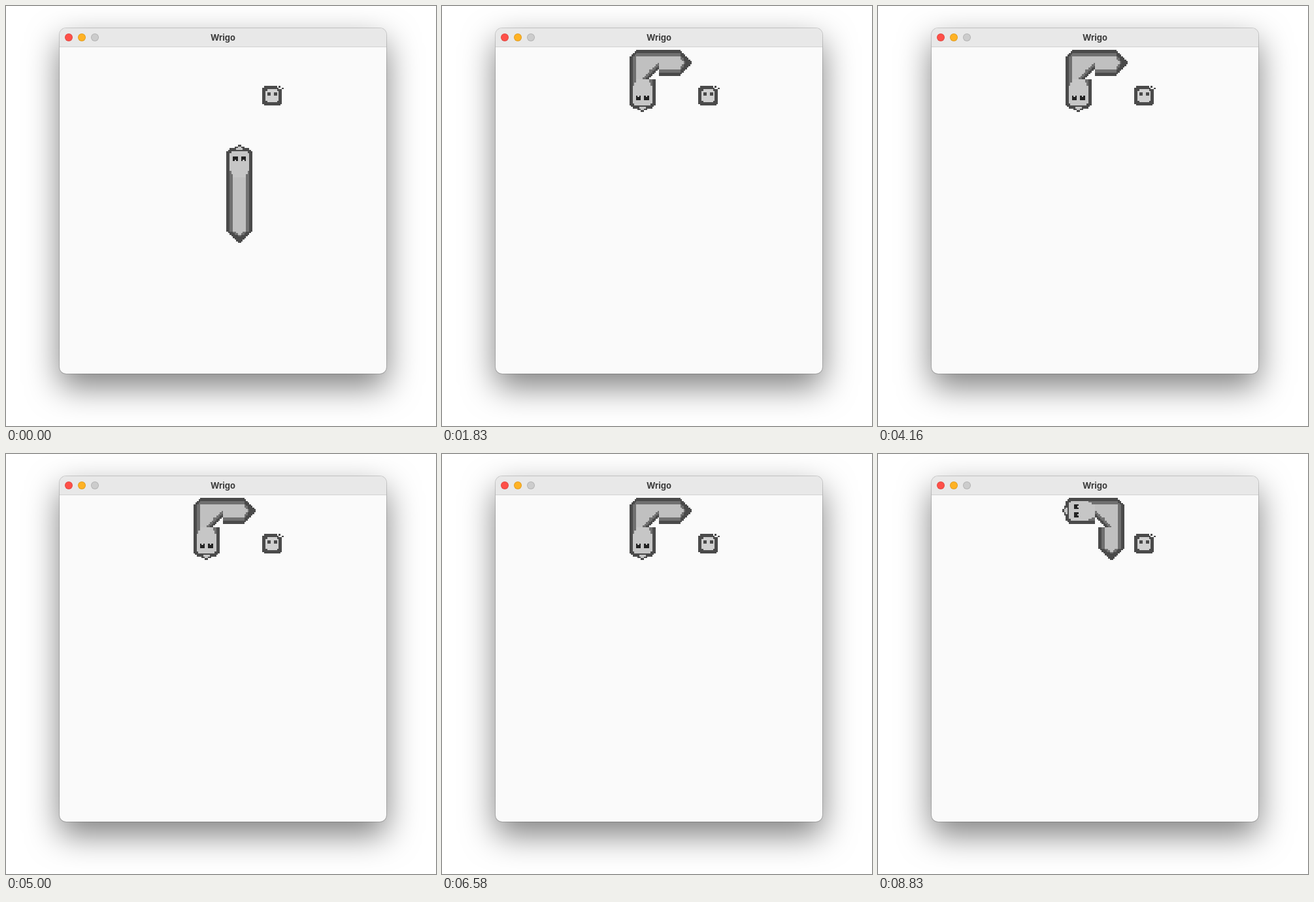
These frames come from a looping animation (658 px wide and 642 px high, 8.91 s). An HTML page with a canvas:

```html
<!DOCTYPE html>
<html lang="en">
<head>
<meta charset="utf-8">
<title>Wrigo</title>
<style>
  html, body { margin: 0; width: 100%; height: 100%; overflow: hidden; background: #fff; }
  .window {
    position: absolute; left: 82px; top: 34px; width: 500px; height: 528px;
    border-radius: 10px; background: #fafafa;
    box-shadow: 0 0 0 1px rgba(0, 0, 0, .16), 0 20px 50px rgba(0, 0, 0, .5);
  }
  .bar {
    height: 28px; border-bottom: 1px solid #d2d2d2; border-radius: 10px 10px 0 0;
    background: #e8e8e8; color: #3c3c3c; text-align: center;
    font: 700 13px/28px Inter, sans-serif;
  }
  .bar i {
    position: absolute; top: 8px; width: 12px; height: 12px; border-radius: 50%;
    box-shadow: inset 0 0 0 1px rgba(0, 0, 0, .12);
  }
  canvas { position: absolute; left: 0; top: 28px; }
</style>
</head>
<body>
<div class="window">
  <div class="bar">
    <i style="left:8px;background:#ff5049"></i>
    <i style="left:28px;background:#ffb224"></i>
    <i style="left:48px;background:#cccccc"></i>
    Wrigo
  </div>
  <canvas width="500" height="500"></canvas>
</div>
<script>
const DARK = '#4a4a4a', MID = '#707070', LIGHT = '#c0c0c0', FACE = '#c6c6c6', EYE = '#222';
const CELL = 50, SIZE = 20, LOOP = 8910;
const ctx = document.querySelector('canvas').getContext('2d');
ctx.imageSmoothingEnabled = false;

// Builds a 20 x 20 sprite from a function giving each pixel's colour.
function sprite(colorAt) {
  const image = document.createElement('canvas');
  image.width = image.height = SIZE;
  const pen = image.getContext('2d');
  for (let y = 0; y < SIZE; y++) {
    for (let x = 0; x < SIZE; x++) {
      const color = colorAt(x, y, Math.abs(x - 9.5));
      if (!color) continue;
      pen.fillStyle = color;
      pen.fillRect(x, y, 1, 1);
    }
  }
  return image;
}

// Colour by distance from the middle line of the body.
const band = d => d > 7.5 ? null : d > 5.5 ? DARK : d > 3.5 ? MID : LIGHT;

const straight = sprite((x, y, d) => band(d));

const corner = sprite((x, y) => {
  const a = x - 9.5, b = 9.5 - y;
  return band(Math.max(Math.abs(Math.max(a, b)), a + b - 3.5, -a - b - 5.5));
});

const tail = sprite((x, y, d) => {
  const taper = Math.max(0, y - 12);
  return d + taper > 7.5 ? null : band(Math.min(7.5, d + 1.5 * taper));
});

const head = sprite((x, y, d) => {
  if (y === 0) return d < 1 && DARK;
  if (y === 1) return d < 1 ? FACE : d < 3 && DARK;
  if (y === 2) return d < 2 ? FACE : d < 6 && DARK;
  if (y === 3) return d < 7 && DARK;
  if (d > 7.5) return null;
  if (d > 6 || y === 4 && d > 5) return DARK;
  if (y >= 16 && d > 5 || y >= 18 && d > 4) return MID;
  const eye = y > 6 && y < 10 && d > 1 && d < 4;
  return eye && !(y === 9 && d === 2.5) ? EYE : FACE;
});

const food = sprite((x, y, d) => {
  if (x === 14 && y === 4 || x === 16 && y === 5) return DARK;
  const e = Math.abs(y - 9.5);
  if (Math.max(d, e) > 5.5 || d + e > 10 || x > 12 && y < 5 || x > 13 && y < 6) return null;
  if (Math.max(d, e) > 4 || d + e > 6.5) return DARK;
  return (y === 8 || y === 9) && d > 1 && d < 3 ? DARK : '#d0d0d0';
});

// Twelve ticks per second: m = the snake moves, t = the head turns before a move.
const script = [
  '..m..m.m.tm.', 'mtm..mtmt.mt', 'mtmt.m.mtm..',
  'mtm.tmtm..m.', 'mtm.tmtm.tm.', 'mtm.tmtmt.mt',
  'm.mt.mtmt.mt', 'mtmt.mt.m.mt', 'm.m.tmt.mtm'
].join('');

const circuit = [[4, 0], [4, 1], [5, 1], [5, 0]];
const cellAt = step => step < 2 ? [5, 3 - step] : circuit[step % 4];
const turnsAt = step => Math.max(0, step - 3);

function put(image, [column, row], turns = 0) {
  ctx.save();
  ctx.translate((column + .5) * CELL, (row + .5) * CELL);
  ctx.rotate(-(turns % 4) * Math.PI / 2);
  ctx.drawImage(image, -CELL / 2, -CELL / 2, CELL, CELL);
  ctx.restore();
}

function draw(now) {
  const time = now % LOOP;
  const tick = Math.ceil((Math.floor(time / 10) + 1) * 3 / 25) - 1;
  const played = script.slice(0, tick + 1);
  const step = played.split('m').length - 1;
  const turning = played.lastIndexOf('t') > played.lastIndexOf('m');
  const bodyTurns = turnsAt(step - 1);

  ctx.clearRect(0, 0, 500, 500);
  put(food, [6, 1]);
  put(tail, cellAt(step - 2), bodyTurns);
  put(turnsAt(step) > bodyTurns ? corner : straight, cellAt(step - 1), bodyTurns);
  put(head, cellAt(step), turnsAt(step) + turning);
  requestAnimationFrame(draw);
}
requestAnimationFrame(draw);
</script>
</body>
</html>
```
